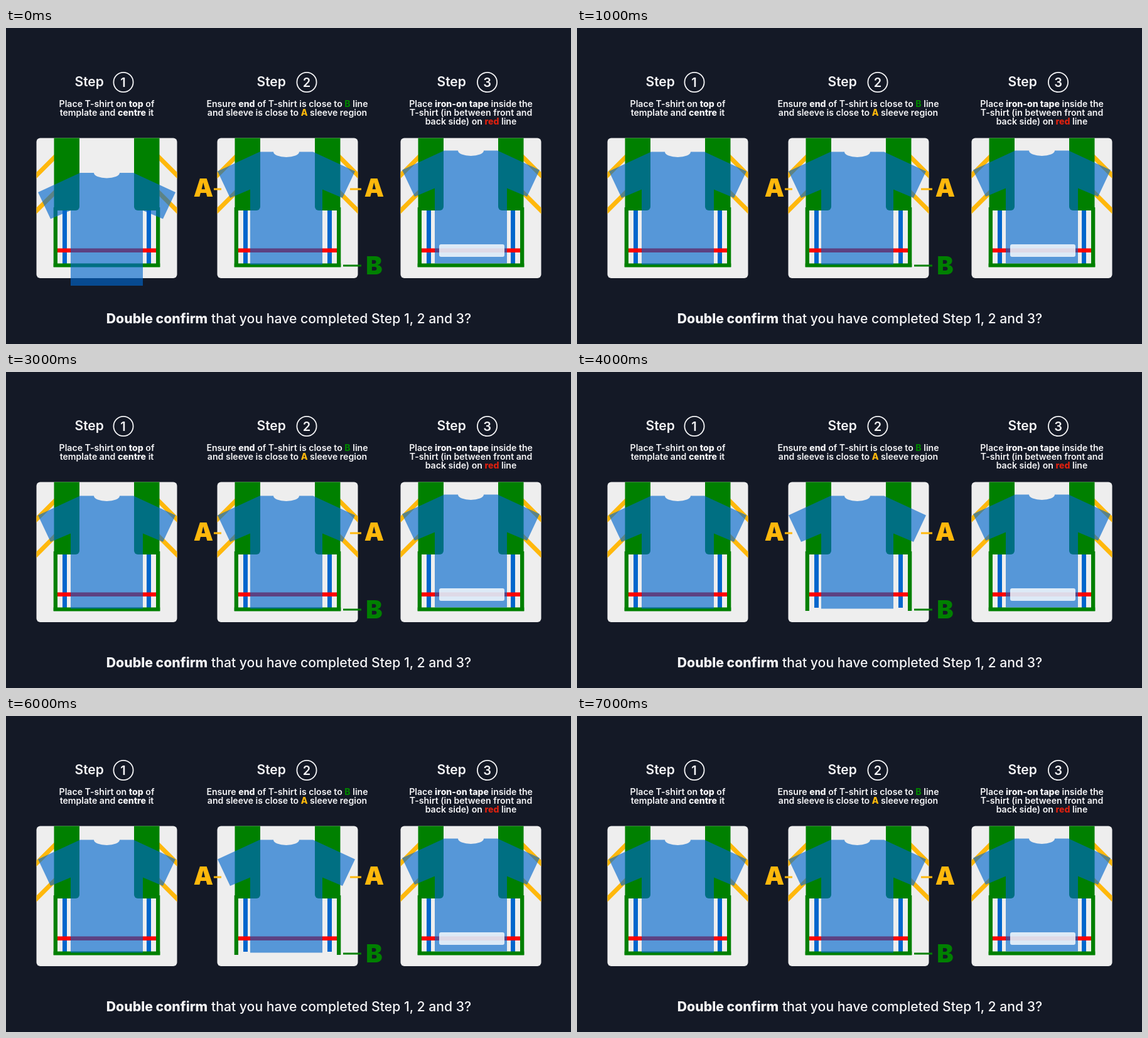
Animation, 900 px wide and 504 px high, one loop 8 s. Source, as an HTML page with a canvas:

```html
<!DOCTYPE html>
<html lang="en">
<head>
<meta charset="utf-8">
<title>T-shirt template steps</title>
<style>
  html, body { margin: 0; width: 100%; height: 100%; overflow: hidden; background: #141926; }
  canvas, svg { position: absolute; left: 0; top: 0; width: 900px; height: 504px; }
  text { font-family: Inter, sans-serif; fill: #f4f4f6; }
  .copy { font-size: 14.1px; font-weight: 600; text-anchor: middle; }
  .step { font-size: 21px; font-weight: 600; }
  .digit { font-size: 20px; font-weight: 600; text-anchor: middle; }
  .footer { font-size: 21.2px; font-weight: 500; text-anchor: middle; }
  .mark { font-size: 39.5px; font-weight: 900; text-anchor: middle; }
  .b { font-weight: 800; }
  .green { fill: #008000; }
  .yellow { fill: #ffb80c; }
  .red { fill: #dc200f; }
  circle { fill: none; stroke: #f4f4f6; stroke-width: 1.8; }
</style>
</head>
<body>
<canvas id="stage" width="900" height="504"></canvas>
<svg viewBox="0 0 900 504">
  <text class="step" x="109.5" y="93">Step</text>
  <circle cx="187" cy="86.5" r="15.6"/>
  <text class="digit" x="186.5" y="93.5">1</text>
  <text class="step" x="399.5" y="93">Step</text>
  <circle cx="479" cy="86.5" r="15.6"/>
  <text class="digit" x="479" y="93.5">2</text>
  <text class="step" x="686.5" y="93">Step</text>
  <circle cx="766.5" cy="86.5" r="15.6"/>
  <text class="digit" x="766.5" y="93.5">3</text>

  <text class="copy" x="160.5" y="125.5">Place T-shirt on <tspan class="b">top</tspan> of</text>
  <text class="copy" x="160.5" y="139.5">template and <tspan class="b">centre</tspan> it</text>
  <text class="copy" x="448" y="125.5">Ensure <tspan class="b">end</tspan> of T-shirt is close to <tspan class="b green">B</tspan> line</text>
  <text class="copy" x="448" y="139.5">and sleeve is close to <tspan class="b yellow">A</tspan> sleeve region</text>
  <text class="copy" x="740.5" y="125.5">Place <tspan class="b">iron-on tape</tspan> inside the</text>
  <text class="copy" x="740.5" y="139.5">T-shirt (in between front and</text>
  <text class="copy" x="740.5" y="154">back side) on <tspan class="b red">red</tspan> line</text>

  <text class="mark yellow" x="314.5" y="269">A</text>
  <text class="mark yellow" x="586.5" y="269">A</text>
  <text class="mark green" x="586.5" y="393">B</text>
  <text class="footer" x="450.5" y="471"><tspan class="b">Double confirm</tspan> that you have completed Step 1, 2 and 3?</text>
</svg>
<script>
const ctx = document.getElementById('stage').getContext('2d');
const COLOR = {
  back: '#141926', panel: '#eeeeee', green: '#008000', yellow: '#ffb80c',
  blue: '#0066cc', red: '#ff0000', shirt: 'rgba(0,102,204,.64)', tape: 'rgba(255,255,255,.8)'
};
const LOOP = 8000, BEAT = 1000, DROP = 33.5;

function rect(x, y, w, h, color) {
  ctx.fillStyle = color;
  ctx.fillRect(x, y, w, h);
}

function rounded(x, y, w, h, radii, color) {
  ctx.fillStyle = color;
  ctx.beginPath();
  ctx.roundRect(x, y, w, h, radii);
  ctx.fill();
}

function line(x1, y1, x2, y2, width, color) {
  ctx.strokeStyle = color;
  ctx.lineWidth = width;
  ctx.beginPath();
  ctx.moveTo(x1, y1);
  ctx.lineTo(x2, y2);
  ctx.stroke();
}

function at(x, y, draw) {
  ctx.save();
  ctx.translate(x, y);
  draw();
  ctx.restore();
}

// Panels and shirts are drawn around a vertical centre line at x = 0.
function panel(x, showGuides) {
  at(x, 0, () => {
    ctx.beginPath();
    ctx.roundRect(-112, 175.5, 224, 223.5, 6);
    ctx.fillStyle = COLOR.panel;
    ctx.fill();
    ctx.clip();
    for (const side of [-1, 1]) {
      ctx.save();
      ctx.scale(side, 1);
      if (showGuides) {
        line(80, 203, 118, 241, 7, COLOR.yellow);
        line(80, 259.5, 118, 297.5, 7, COLOR.yellow);
      }
      rounded(43.5, 170, 40.5, 121, [0, 0, 0, 6], COLOR.green);
      rect(78.5, 286, 6.3, 95, COLOR.green);
      rect(63.5, 291, 7, 85, COLOR.blue);
      ctx.restore();
    }
    if (showGuides) rect(-84.8, 375.5, 169.6, 6, COLOR.green);
    rect(-78.5, 351.5, 157, 6.5, COLOR.red);
  });
}

function shirt(x, y) {
  const right = [[42.5, 0], [109.5, 31], [89.5, 73.5], [57.5, 60], [57.5, 180]];
  at(x, y, () => {
    ctx.beginPath();
    ctx.moveTo(20.5, 0);
    for (const [px, py] of right) ctx.lineTo(px, py);
    for (const [px, py] of right.slice().reverse()) ctx.lineTo(-px, py);
    ctx.lineTo(-20.5, 0);
    ctx.ellipse(0, 0, 20.5, 8.5, 0, Math.PI, 0, true);
    ctx.fillStyle = COLOR.shirt;
    ctx.fill();
  });
}

function draw(time) {
  const beat = Math.floor((time % LOOP) / BEAT);
  const odd = beat % 2 === 1;
  const aligning = beat < 4;
  rect(0, 0, 900, 504, COLOR.back);

  panel(160.5, true);
  shirt(160.5, 197.5 + (aligning && !odd ? DROP : 0));

  panel(448.5, aligning || odd);
  shirt(446.5, 197.5);
  line(331, 257, 343, 257, 3, COLOR.yellow);
  line(548, 257, 566, 257, 3, COLOR.yellow);
  line(537, 379, 566, 379, 3, COLOR.green);

  panel(740.5, true);
  shirt(740.5, 195.5);
  rounded(690, 345, 104, 20, 3, COLOR.tape);
}

let start;
function tick(now) {
  start ??= now;
  draw(now - start);
  requestAnimationFrame(tick);
}
draw(0);
requestAnimationFrame(tick);
</script>
</body>
</html>
```
